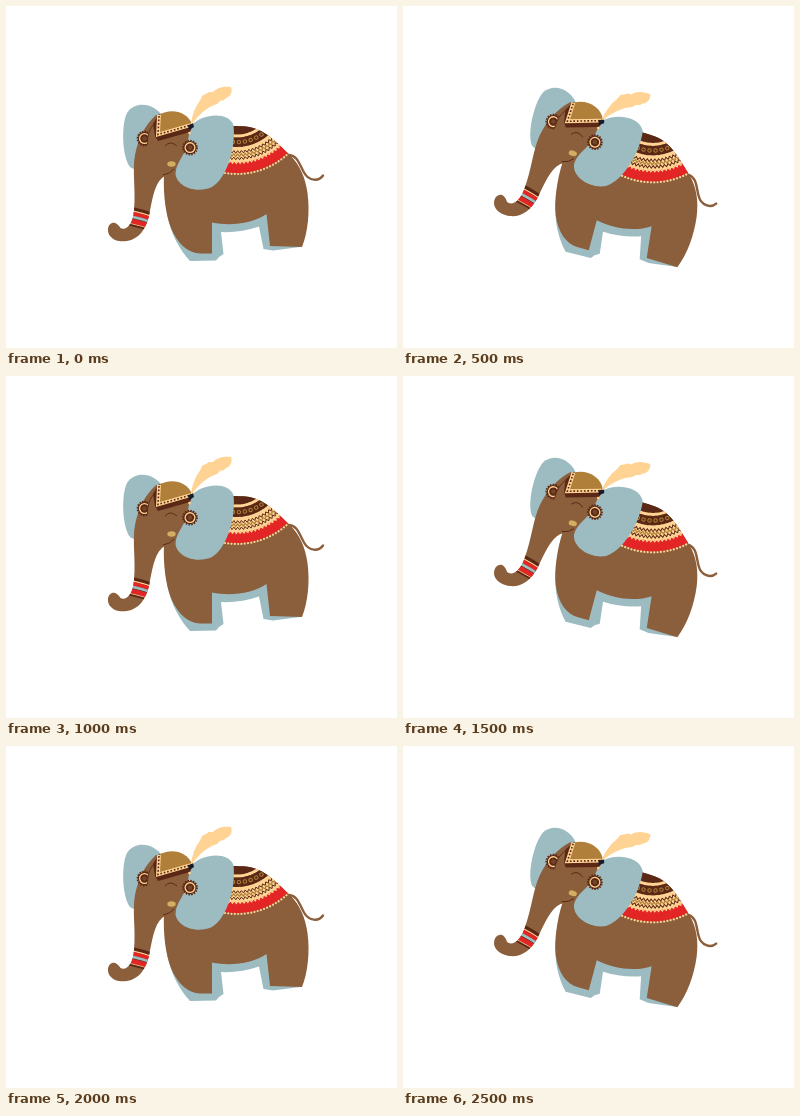
An HTML page that plays this animation: 391 by 342 pixels, repeating every 3000 ms.

```html
<!DOCTYPE html>
<html lang="en">
<head>
<meta charset="utf-8">
<title>Rocking elephant</title>
<style>
  html, body { margin: 0; width: 100%; height: 100%; overflow: hidden; background: #fff; }
  svg { display: block; width: 100%; height: 100%; }
  .brown { fill: #8b5e3c; } .blue { fill: #9cbcc2; } .cream { fill: #ffd393; }
  .gold { fill: #b0803a; } .dark { fill: #5a2814; }
  .line { fill: none; stroke: #5a2814; }
</style>
</head>
<body>
<svg viewBox="0 0 391 342">
  <defs>
    <path id="body" d="M158 168C157 190 160 209 165 222C172 239 183 247 194 247.500L206 247.500L206 216.500C225 220.500 246 217.500 260.500 208L264 240L296 241C302 226 304 206 301.500 187C299.500 172 294 159 284 149C271 137 258 122 240 120.500C222 119 190 120 175 130Z"/>
    <path id="trunk" d="M150 109C139 119 132 133 129 149C126 165 130 183 128 204C127 219 120 225 114.500 222C112 218 109 216 106 217C101 219 101 226 104 230C108 235 115 236 121 235C133 233 140 223 143 210C146 195 148 179 156 172Q161 168 168 166L190 150L188 118Z"/>
    <clipPath id="bodyClip"><use href="#body"/></clipPath>
    <clipPath id="trunkClip"><use href="#trunk"/></clipPath>
    <g id="earring">
      <circle r="6.700" class="dark"/>
      <circle r="7" class="line" stroke-width="1.800" stroke-dasharray="1.500 1.250"/>
      <circle r="5.500" class="cream"/>
      <circle r="4.200" class="dark"/>
      <circle r="2.300" fill="#754528"/>
    </g>
  </defs>
  <g id="elephant">
    <path class="blue" d="M161 208C165 229 174 244 184 255L210 254.500L213 251L217.500 248L215 226Q234 227 253 220.500L257.500 243L267 244.500L294 241L262 200L205 208Z"/>
    <path d="M283 149C292 150 293 158 298 166.500C303 175.500 313 175.500 317 169.500" fill="none" stroke="#8b5e3c" stroke-width="2.400" stroke-linecap="round"/>
    <use href="#body" class="brown"/>
    <g id="blanket" clip-path="url(#bodyClip)"></g>

    <path class="blue" d="M157 111C149 97 129 94 121 107C115 119 116 151 124 161Q127 164 131 162L150 130Z"/>
    <use href="#trunk" class="brown"/>
    <use href="#earring" x="138.500" y="132.500"/>
    <path class="brown" d="M150 112C143 120 141 127 141.500 139L152 138Z"/>
    <path class="line" stroke-width=".8" d="M147 119Q141 127 141.500 138"/>
    <g id="stripes" clip-path="url(#trunkClip)"></g>

    <path class="blue" d="M186 119C196 108 222 105 227.500 119C230 142 221 172 206 181C191 188 171 181 169.500 168C169.500 157 179 149 181 139C183 131 183 124 186 119Z"/>
    <use href="#earring" x="184" y="141.600"/>

    <path class="dark" d="M153 108L147 118L149 130L152 135L184 126L187 119L172 118Z"/>
    <path class="gold" d="M153 109C164 102 181 105 186 118L152 129Z"/>
    <path d="M153 109L152 128.500L185 119" fill="none" stroke="#ffd393" stroke-width="3.800"/>
    <path class="line" stroke-width="1.600" stroke-dasharray="1.700 1.800" d="M153 110L152 128.500L185 119"/>
    <path d="M182 119.500L187 117L188 121L183 124Z" fill="#171b2b"/>
    <circle cx="183.500" cy="127" r="1.300" class="cream"/>
    <path class="cream" d="M185 118C186 109 189 101 194 94.500L196.500 89.500L200 88L203 86L207 86C211 81 219 80 225 81C227 86 224 91 220 92L218 94L214 95L211 98L207 99.500C199 103 192 110 186 118Z"/>

    <path class="line" stroke-width=".9" d="M159 140Q164 134 171 140M157 169Q164 168 168 163"/>
    <ellipse cx="165.500" cy="158" rx="4.200" ry="2.700" fill="#d4ad60"/>
  </g>
</svg>
<script>
const svgNS = "http://www.w3.org/2000/svg";
const blanket = document.getElementById("blanket");
const stripes = document.getElementById("stripes");
const elephant = document.getElementById("elephant");
const CREAM = "#ffd393", DARK = "#5a2814", RED = "#e32526", GOLD = "#b0803a";

function add(parent, d, stroke, width, extra = {}) {
  const path = document.createElementNS(svgNS, "path");
  const attrs = { d, fill: "none", stroke, "stroke-width": width, ...extra };
  for (const key in attrs) path.setAttribute(key, attrs[key]);
  parent.append(path);
}

// Blanket bands are arcs around one centre; a wave turns an arc into a zigzag.
function arc(radius, wave = 0) {
  const step = wave ? 1.9 / radius : 0.05;
  let d = "";
  for (let a = 0.4, i = 0; a < 2.2; a += step, i++) {
    const r = radius + (i % 2 ? wave : -wave);
    d += `${d ? "L" : "M"}${(231 + r * Math.cos(a)).toFixed(2)} ${(93.5 + r * Math.sin(a)).toFixed(2)}`;
  }
  return d;
}
const band = (from, to, color) => add(blanket, arc((from + to) / 2), color, to - from);
const zigzag = (r, wave, color, width) => add(blanket, arc(r, wave), color, width);
const beads = (r, size, gap, color) =>
  add(blanket, arc(r), color, size, { "stroke-linecap": "round", "stroke-dasharray": `0.01 ${gap}` });

band(20, 35, DARK);
band(35, 38, CREAM);
band(38, 47.5, DARK);
beads(42.7, 4.4, 6, GOLD);
beads(42.7, 2.4, 6, DARK);
band(47.5, 64, CREAM);
zigzag(52.5, 1.3, DARK, 1);
zigzag(55.7, 1.3, GOLD, 1.2);
zigzag(59, 1.3, DARK, 1);
band(62.5, 73.5, RED);
zigzag(62.7, 1.2, CREAM, 1.2);
beads(74.5, 2.2, 3.3, CREAM);

[[204.5, DARK, 3.2], [206.8, CREAM, 1.2], [209.4, RED, 4], [212.8, "#9cbcc2", 2.8],
 [214.6, DARK, 0.8], [217.3, RED, 4.6], [220, CREAM, 0.8], [221.3, DARK, 1.8]]
  .forEach(([y, color, width]) => add(stripes, `M122 ${y - 3}Q136 ${y} 150 ${y + 5}`, color, width));

function draw() {
  const tilted = Math.floor(performance.now() / 500) % 2;
  elephant.setAttribute("transform", `rotate(${tilted * 15} 208.5 169)`);
  requestAnimationFrame(draw);
}
draw();
</script>
</body>
</html>
```
